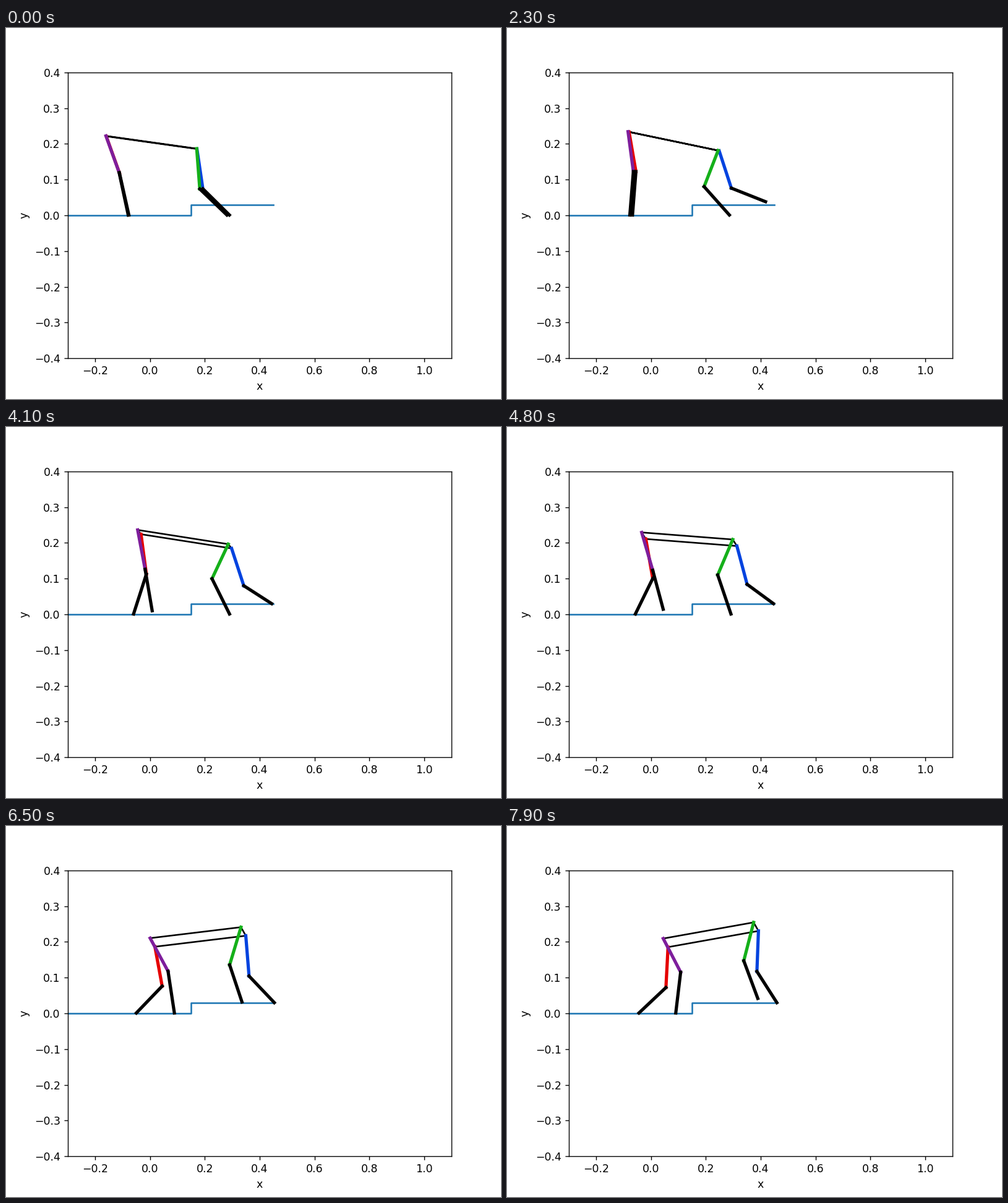
A matplotlib script for the animation above (8 s loop, 800x600 px).

```python
import numpy as np
import matplotlib.pyplot as plt
from matplotlib.animation import FuncAnimation

FRAMES, STEP = 80, 100
SPAN = (FRAMES - 1) * STEP / 1000
UPPER, SPINE = 0.1135, 0.333  # link lengths


def wave(t, start, end, *amps):
    """Straight line from start to end plus sine harmonics over the span."""
    u = t / SPAN
    return start + (end - start) * u + sum(
        a * np.sin(k * np.pi * u) for k, a in enumerate(amps, 1))


def ease(t, t0, t1):
    u = np.clip((t - t0) / (t1 - t0), 0, 1)
    return u * u * (3 - 2 * u)


class Leg:
    """A thigh swinging at the hip, and a foot that slips, then takes one step."""

    def __init__(self, color, swing, x, slip, t0=0, time=1, stride=0, rise=0,
                 lift=0, slow=1, skew=1):
        self.color, self.swing = color, swing
        self.x, self.slip = x, slip
        self.t0, self.time, self.stride = t0, time, stride
        self.rise, self.lift = rise, lift
        self.slow, self.skew = slow, skew

    def foot(self, t):
        u = np.clip((t - self.t0) / self.time, 0, 1)
        x = self.x + self.slip * t + self.stride * (1 - (1 - u) ** self.slow)
        y = 0.001 + self.rise * u + self.lift * np.sin(np.pi * u ** self.skew)
        return np.array([x, y])

    def knee(self, t, hip):
        a = np.radians(wave(t, *self.swing))
        return hip + UPPER * np.array([np.sin(a), -np.cos(a)])


LEGS = [
    Leg("red", (25.1, -3.9, 2.7, -7.8, 3.8), x=-0.0775, slip=0.0042),
    Leg("purple", (25.1, 34, -14, -8.1, 2.9), x=-0.0798, slip=0.001,
        t0=2.8, time=3.4, stride=0.162, lift=0.0135, slow=1.5, skew=1.5),
    Leg("blue", (10.9, -2.8, 18.3, 2.2, -1.3), x=0.2894, slip=0.004,
        time=2.75, stride=0.138, rise=0.029, lift=0.036, slow=1.1, skew=0.7),
    Leg("green", (5.7, -18.5, -24.9, -6.1, 0.5), x=0.2804, slip=0.0023,
        t0=5.4, time=3, stride=0.109, rise=0.029, lift=0.027, skew=1.3),
]


def hips(t):
    rear = np.array([wave(t, -0.161, 0.0444, 0.0085, 0.0115, -0.002),
                     wave(t, 0.2225, 0.2095, 0.0162, 0.0051, -0.0052)])
    pitch = np.arcsin(wave(t, -0.107, 0.136, -0.118, -0.04, 0.026))
    front = rear + SPINE * np.array([np.cos(pitch), np.sin(pitch)])
    side = np.array([0.001 + 0.0165 * ease(t, 1, 6),
                     -0.001 - 0.023 * ease(t, 2.3, 6)])
    return {"purple": rear, "green": front, "blue": front + side, "red": rear + side}


fig, ax = plt.subplots(figsize=(6.4, 4.8), dpi=125)
ax.set(xlim=(-0.3, 1.1), ylim=(-0.4, 0.4), xlabel="x", ylabel="y")
ax.plot([-0.3, 0.15, 0.15, 0.45], [0, 0, 0.03, 0.03], color="C0", lw=1.5)

body, = ax.plot([], [], color="black", lw=1.5)
thighs = [ax.plot([], [], color="xkcd:" + leg.color, lw=3)[0] for leg in LEGS]
shins = [ax.plot([], [], color="black", lw=3)[0] for _ in LEGS]


def update(i):
    t = i * STEP / 1000
    hip = hips(t)
    loop = list(hip.values())
    body.set_data(*np.transpose(loop + loop[:1]))
    for leg, thigh, shin in zip(LEGS, thighs, shins):
        top = hip[leg.color]
        knee = leg.knee(t, top)
        thigh.set_data(*np.transpose([top, knee]))
        shin.set_data(*np.transpose([knee, leg.foot(t)]))
    return [body, *thighs, *shins]


anim = FuncAnimation(fig, update, frames=FRAMES, interval=STEP, repeat=True, repeat_delay=0)
plt.show()
```
